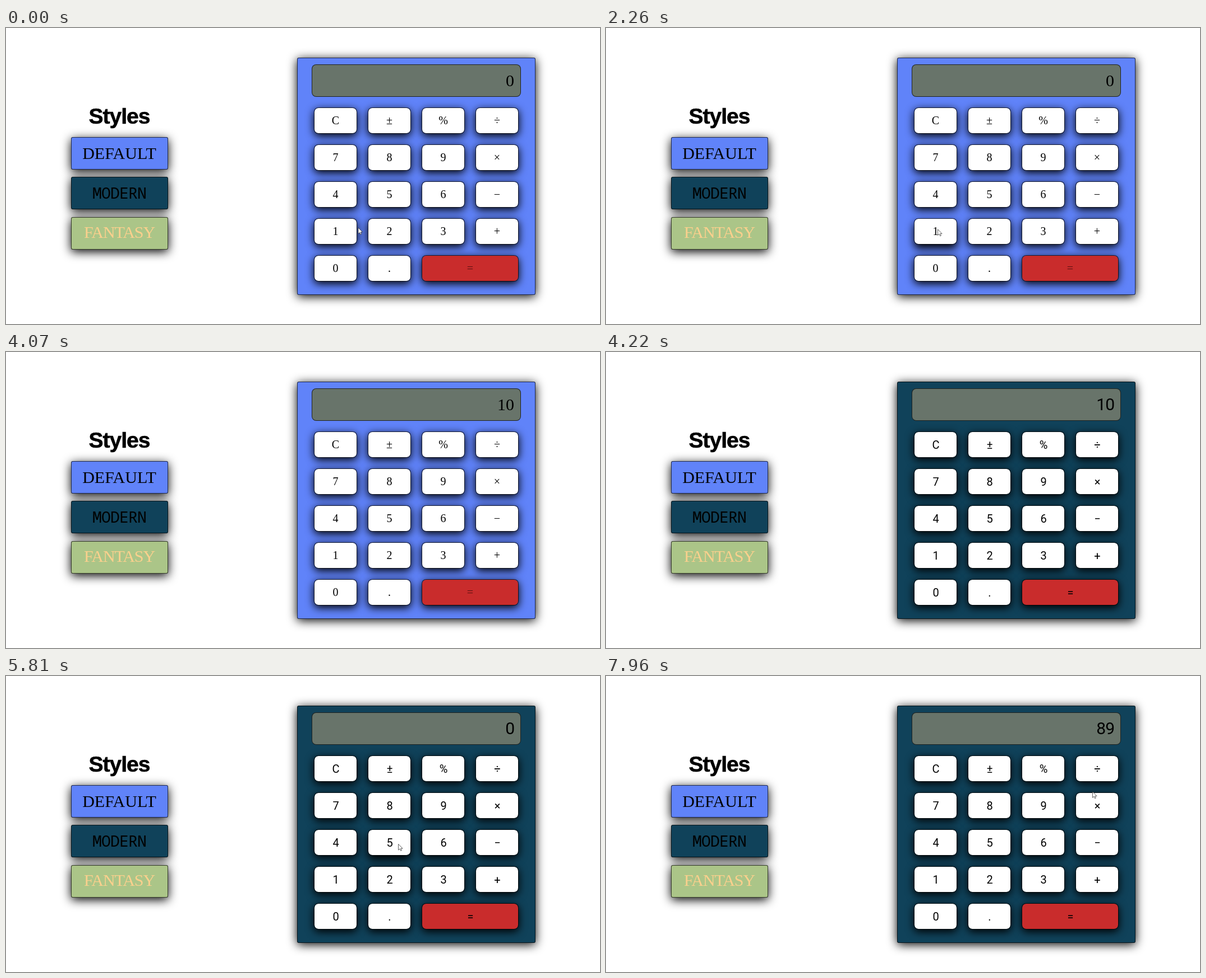
Recreate the animation shown at these times as an HTML page. Size 1059 by 529 pixels, loop 8 s.

```html
<!DOCTYPE html>
<html lang="en">
<head>
<meta charset="utf-8">
<title>Calculator styles</title>
<style>
  html, body { margin: 0; width: 100%; height: 100%; overflow: hidden; background: #fff; }
  #stage { position: relative; width: 1059px; height: 529px; overflow: hidden; color: #000; }
  #stage div, #cursor { position: absolute; box-sizing: border-box; }
  .box {
    display: flex; align-items: center; justify-content: center;
    border: 1px solid rgba(0, 0, 0, .7); white-space: nowrap;
  }
  h1 {
    position: absolute; left: 102px; top: 135px; width: 200px; margin: 0;
    text-align: center; font: bold 39px/46px "Liberation Sans", Arial, sans-serif;
    letter-spacing: -1px; -webkit-text-stroke: .6px #000;
  }
  .style { border-radius: 3px; box-shadow: 0 4px 18px #000; font: 30px "Liberation Serif", serif; }
  .default { background: #6083f9; }
  .modern { background: #10425a; }
  .fantasy { background: #abc588; }
  .style.modern { padding-bottom: 2px; font: 28px "Noto Sans Mono", monospace; letter-spacing: -.8px; }
  .style.fantasy { padding-bottom: 3px; color: #fbd08d; letter-spacing: -1.1px; }
  #calc { border-radius: 3px; box-shadow: 0 3px 18px #000; }
  #pad { left: 0; top: 0; font-family: "Liberation Serif", serif; }
  #pad.sans { font-family: Roboto, sans-serif; font-stretch: 75%; letter-spacing: -1px; }
  #screen { justify-content: flex-end; padding-right: 11px; border-radius: 8px; background: #68746a; font-size: 30px; }
  .key { border-radius: 8px; background: #fff padding-box; box-shadow: 0 4px 15px #000; font-size: 20px; }
  .key.equals { background-color: #c92c2c; }
  #pad:not(.sans) .equals { color: #5c1212; }
  .key.hover { box-shadow: 0 7px 15px #000; }
  #cursor { left: 0; top: 0; overflow: visible; }
</style>
</head>
<body>
<div id="stage">
  <h1>Styles</h1>
  <div id="calc" class="box"></div>
  <div id="pad"></div>
  <svg id="cursor" width="9" height="14">
    <path d="M0 0V10.6L2.5 8.4L4.2 12L5.9 11.2L4.3 7.8H7.6Z" fill="#fff" stroke="#222" stroke-width=".7"/>
  </svg>
</div>
<script>
const LOOP = 8000;
const [stage, pad, calc, cursor] =
  ['stage', 'pad', 'calc', 'cursor'].map(id => document.getElementById(id));
const targets = {};

function place(el, x, y, w, h) {
  Object.assign(el.style, { left: x + 'px', top: y + 'px', width: w + 'px', height: h + 'px' });
}

function addBox(parent, className, label, x, y, w, h) {
  const el = document.createElement('div');
  el.className = 'box ' + className;
  el.textContent = label;
  place(el, x, y, w, h);
  parent.append(el);
  targets[label] = { el, x, y, w, h };
  return el;
}

['default', 'modern', 'fantasy'].forEach((name, i) =>
  addBox(stage, 'style ' + name, name.toUpperCase(), 115.5, 194.5 + i * 71.5, 173, 58));

place(calc, 519, 53, 424.5, 423.5);
const screen = addBox(pad, '', '', 545, 64.5, 373, 58.5);
screen.id = 'screen';

['C±%÷', '789×', '456−', '123+', '0.='].forEach((row, r) =>
  [...row].forEach((label, c) => {
    const equals = label === '=';
    addBox(pad, equals ? 'key equals' : 'key', label,
      549 + c * 96, 142.3 + r * 66, equals ? 173 : 77, 47);
  }));

// Each trip: leave, arrive, press time, target, offset from its centre
const trips = [
  [40, 380, 440, '1'],
  [480, 810, 890, '0', -9, 6],
  [960, 1300, 1420, '='],
  [1440, 1630, 1700, '+'],
  [1720, 2240, 2300, '1', 4, -4],
  [2520, 2660, 2740, '0', -9, 6],
  [3000, 3220, 3260, '='],
  [3280, 3960, 4190, 'MODERN', 27, 0],
  [4190, 4590, null, '5', -16, -15],
  [4700, 5220, 5370, 'C', 0, 0],
  [5520, 5860, null, '5', 23, 11],
  [5900, 6300, 6560, '8'],
  [6560, 6670, null, '8', 12, 30],
  [6670, 7330, 7520, '9', 8, 7],
  [7520, 7800, null, '×', 31, 8],
  [7800, 7960, null, '×', -8, -25]
];

const smooth = u => u * u * (3 - 2 * u);
const mix = (a, b, u) => a + (b - a) * u;

function cursorAt(t) {
  let x = 628, y = 357;
  for (const [leave, arrive, , label, dx = 4, dy = 4] of trips) {
    if (t < leave) break;
    const box = targets[label];
    const u = smooth(Math.min(1, (t - leave) / (arrive - leave)));
    x = mix(x, box.x + box.w / 2 + dx, u);
    y = mix(y, box.y + box.h / 2 + dy, u);
  }
  return [x, y];
}

const operations = {
  '+': (a, b) => a + b, '−': (a, b) => a - b, '×': (a, b) => a * b, '÷': (a, b) => a / b
};

// Replays all presses up to t, with "10 −" already entered
function stateAt(t) {
  const state = { entry: '0', stored: 10, op: '−', modern: false };
  for (const [, , pressed, label] of trips) {
    if (pressed === null || pressed > t) continue;
    if (label === 'MODERN') state.modern = true;
    else if (label === 'C') state.entry = '0';
    else if (label === '=') state.entry = String(operations[state.op](state.stored, +state.entry));
    else if (label in operations) Object.assign(state, { stored: +state.entry, op: label, entry: '0' });
    else state.entry = state.entry === '0' ? label : state.entry + label;
  }
  return state;
}

let start;
function draw(now) {
  start ??= now;
  const t = (now - start) % LOOP;
  const { entry, modern } = stateAt(t);
  const [cx, cy] = cursorAt(t);
  screen.textContent = entry;
  calc.className = 'box ' + (modern ? 'modern' : 'default');
  pad.className = modern ? 'sans' : '';
  cursor.style.transform = `translate(${cx}px, ${cy}px)`;
  for (const { el, x, y, w, h } of Object.values(targets)) {
    el.classList.toggle('hover', cx >= x && cx < x + w && cy >= y && cy < y + h);
  }
  requestAnimationFrame(draw);
}
requestAnimationFrame(draw);
</script>
</body>
</html>
```
